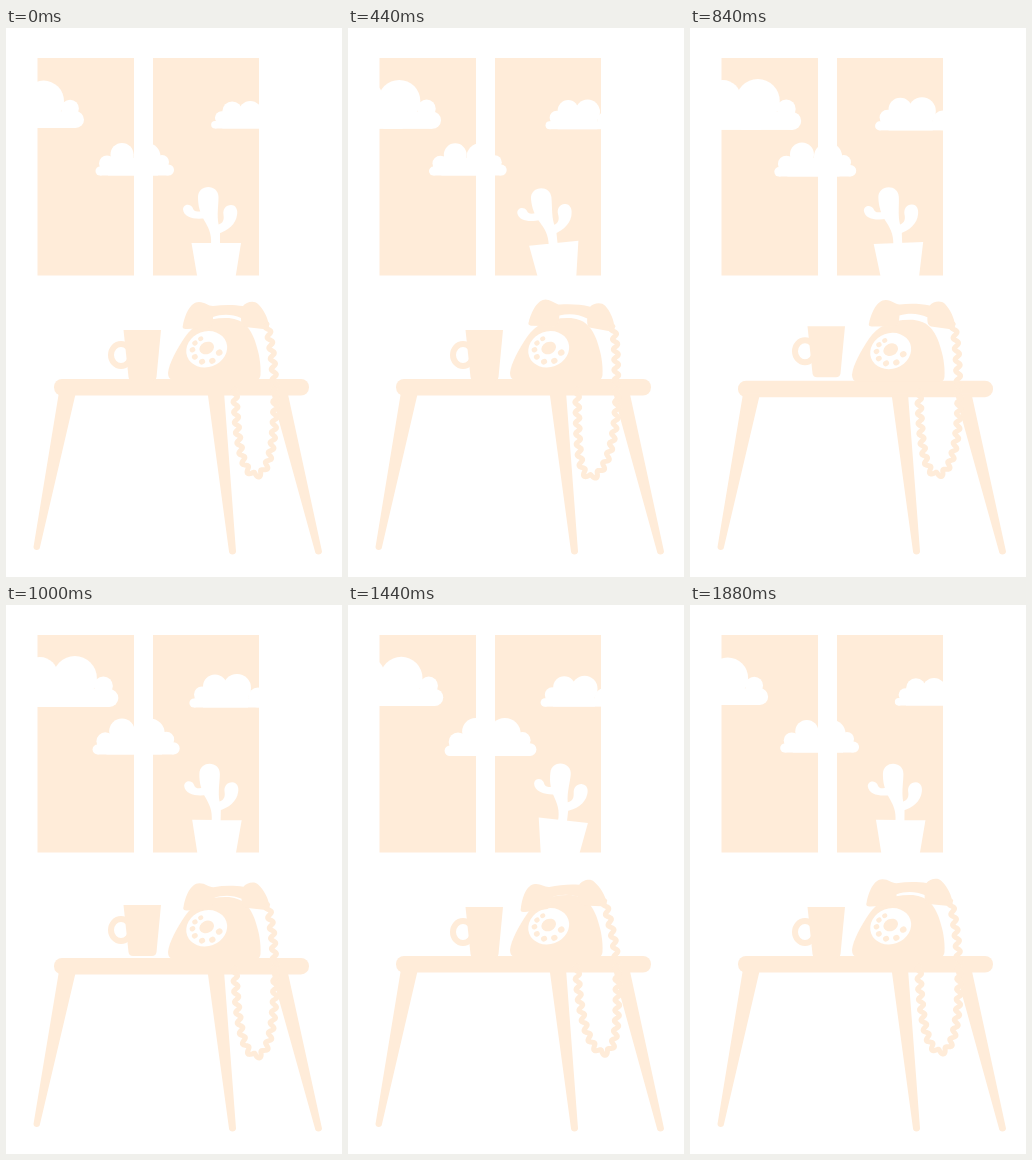
Recreate the animation shown at these times as an HTML page with a canvas. Size 336x549 px, loop 1920 ms.

```html
<!DOCTYPE html>
<html lang="en">
<head>
<meta charset="utf-8">
<title>Ringing telephone</title>
<style>
  html, body { margin: 0; width: 100%; height: 100%; overflow: hidden; background: #fff; }
  canvas { display: block; width: 336px; height: 549px; }
</style>
</head>
<body>
<canvas id="stage" width="336" height="549"></canvas>
<script>
const ctx = document.getElementById('stage').getContext('2d');
const LOOP = 1920, STEP = 40;
const TAN = '#ffecd9', WHITE = '#fff';
const TIMES = [0, 440, 720, 1000, 1200, 1440];

// Smooth looping curve through one value per entry of TIMES, without overshoot.
function track(...v) {
  const n = TIMES.length;
  const span = TIMES.map((t, i) => (i + 1 < n ? TIMES[i + 1] : LOOP) - t);
  const rise = v.map((a, i) => (v[(i + 1) % n] - a) / span[i]);
  const slope = rise.map((b, i) => {
    const a = rise[(i + n - 1) % n];
    return a * b > 0 ? 2 * a * b / (a + b) : 0;
  });
  return t => {
    let i = n - 1;
    while (TIMES[i] > t) i--;
    const j = (i + 1) % n, h = span[i], u = (t - TIMES[i]) / h, w = 1 - u;
    return w * w * (1 + 2 * u) * v[i] + u * u * (3 - 2 * u) * v[j]
      + h * u * w * (w * slope[i] - u * slope[j]);
  };
}

const midX = track(89, 80.5, 82.5, 86, 90, 96);
const midY = track(147.5, 147.5, 148, 149.5, 151, 151);
const midScale = track(1, 0.99, 1.01, 1.11, 1.18, 1.17);
const potTilt = track(0, -0.1, -0.07, 0.015, 0.09, 0.113);
const mugY = track(0, 0, -5, -2, -3, 0);
const handX = track(0, 4.5, 3.5, 0.5, -3, -5);
const handY = track(0, -0.5, -4.5, 4, 3, 3);
const handTilt = track(0, 0.07, 0.055, -0.01, -0.045, -0.075);
const tipX = track(250, 243, 246, 250.5, 254.5, 256);
const tipY = track(447, 449, 444, 451, 448, 448);

const wave = (t, delay = 0) => (1 - Math.cos(2 * Math.PI * (t - delay) / LOOP)) / 2;
const tableDip = t => t > 480 && t < 1440 ? 2 * Math.sin(Math.PI * (t - 480) / 960) ** 2 : 0;

// Circles are [x, y, r], slabs [x, y, w, h], measured from a bottom corner.
const LEFT_CLOUD = {
  puffs: [[-78.5, -32, 18], [-43.5, -29, 22], [-15, -21, 9.5], [-9, -9, 9]],
  slabs: [[-110, -30, 70, 30], [-60, -18, 51, 18]]
};
const RIGHT_CLOUD = {
  puffs: [[5, -4.5, 4.6], [13, -13, 8], [26, -21, 12], [48, -19.5, 14], [69, -10, 10]],
  slabs: [[5, -9, 75, 9], [14, -18, 45, 18]]
};
const MID_CLOUD = {
  puffs: [[5, -4.5, 4.5], [12, -12, 8], [27, -21, 11.5], [52, -19, 13.5], [67, -13.5, 7], [73.5, -5.5, 5.5]],
  slabs: [[5, -9, 68.5, 9], [13, -18, 50, 18]]
};

const BODY = new Path2D(`M167 352 Q162 351 162 345 C163 335 171 321 179 309
  C187 297 200 290 220 290 C236 290 244 299 249 313 C253 325 255 335 254.500 347
  Q254 352 250 352 Z`);
const HANDSET = new Path2D(`M177 297 C179 287 184 274 193 274 C199 274 202 278 207 278
  C217 276.500 228 276.500 237 278 C240 274 248 272 252 276 C258 282 262 290 263 298
  C263 302 260 302 257 301 L239 299 C236 298 235 296 235 290
  C226 286 216 286 207 289 C207 295 206 300 202 300 L181 301 C177 301 176 300 177 297 Z`);
const MUG = new Path2D('M117.500 302 H155 L150.500 349 Q150 353 146 353 H127 Q123 353 122.500 349 Z');
const CACTUS = new Path2D(`M185.500 215 H235 L227.500 262 H193.500 Z
  M192 169 C192 155.500 212.500 155.500 212.500 169 C212.500 180 210 190 214 202 V217 H205
  C206 205 202 199 198 192 C194 185 192 178 192 169 Z`);
const ARMS = new Path2D(`M177 181.500 C177 176 184 175 186.500 179.500 C188 184 191 184 196 183
  L200 190 C190 192 178 190 177 181.500 Z
  M217.500 187 C216.500 181 220 177 225 177 C230 177 232 182 231 187
  C230 196 222 203 211 206 V197 C216 196 218.500 193 217.500 187 Z`);

function at(x, y, draw, turn = 0, scale = 1) {
  ctx.save();
  ctx.translate(x, y);
  ctx.rotate(turn);
  ctx.scale(scale, scale);
  draw();
  ctx.restore();
}

function oval(x, y, rx, ry, turn, color) {
  ctx.fillStyle = color;
  ctx.beginPath();
  ctx.ellipse(x, y, rx, ry, turn, 0, 2 * Math.PI);
  ctx.fill();
}

function cloud(shape, x, y, scale) {
  at(x, y, () => {
    for (const [cx, cy, r] of shape.puffs) oval(cx, cy, r, r, 0, WHITE);
    for (const s of shape.slabs) ctx.fillRect(...s);
  }, 0, scale);
}

function leg(topY, left, right, footL, footR, footY) {
  ctx.beginPath();
  ctx.moveTo(left, topY);
  ctx.lineTo(right, topY);
  ctx.lineTo(footR, footY);
  ctx.bezierCurveTo(footR, footY + 4, footL, footY + 4, footL, footY);
  ctx.fill();
}

// Points along a cubic curve given by four [x, y] pairs.
function curve(a, b, c, d, count = 120) {
  const mix = (k, u, w) => w * w * w * a[k] + 3 * w * w * u * b[k] + 3 * w * u * u * c[k] + u * u * u * d[k];
  return Array.from({ length: count + 1 }, (_, i) => {
    const u = i / count;
    return [mix(0, u, 1 - u), mix(1, u, 1 - u)];
  });
}

// Strokes a wavy line with a fixed number of coils along the points.
function coil(points, coils) {
  const dist = [0];
  for (let i = 1; i < points.length; i++) {
    dist[i] = dist[i - 1] + Math.hypot(points[i][0] - points[i - 1][0], points[i][1] - points[i - 1][1]);
  }
  const total = dist[dist.length - 1];
  ctx.beginPath();
  points.forEach(([x, y], i) => {
    const p = points[Math.max(0, i - 1)], q = points[Math.min(points.length - 1, i + 1)];
    const dx = q[0] - p[0], dy = q[1] - p[1], len = Math.hypot(dx, dy) || 1;
    const off = 2.4 * Math.sin(2 * Math.PI * coils * dist[i] / total);
    ctx.lineTo(x - dy / len * off, y + dx / len * off);
  });
  ctx.lineWidth = 5;
  ctx.lineJoin = ctx.lineCap = 'round';
  ctx.stroke();
}

function drawWindow(t) {
  ctx.fillStyle = TAN;
  ctx.fillRect(31.5, 30, 96.5, 217.500);
  ctx.fillRect(147, 30, 106, 217.500);
  const a = wave(t), b = wave(t, 50);
  cloud(LEFT_CLOUD, 78 + 34.5 * a, 100 + 2 * a, 0.93 + 0.07 * a);
  cloud(RIGHT_CLOUD, 205 - 22 * b, 100.5 + 2 * b, 0.82 + 0.18 * b);
  cloud(MID_CLOUD, midX(t), midY(t), midScale(t));
  at(210.5, 260, () => {
    ctx.translate(-210.5, -260);
    ctx.fillStyle = WHITE;
    ctx.fill(CACTUS);
    ctx.fill(ARMS);
  }, potTilt(t));
}

function drawTable(dip) {
  ctx.fillStyle = TAN;
  ctx.beginPath();
  ctx.roundRect(48, 351 + dip, 255, 16.5, 8);
  ctx.fill();
  const top = 364 + dip;
  leg(top, 53, 70, 27.5, 34, 519);
  leg(top, 201.5, 218, 223, 230, 523.5);
  leg(top, 265, 281.5, 309, 316, 523.5);
}

function drawMug(y) {
  at(0, y, () => {
    ctx.lineWidth = 6;
    ctx.beginPath();
    ctx.ellipse(115, 327, 10, 11, 0, 0, 2 * Math.PI);
    ctx.stroke();
    ctx.fill(MUG);
  });
}

function drawDial() {
  oval(200.7, 321.3, 20.8, 17.8, -0.35, WHITE);
  oval(200.7, 320, 7.6, 6, -0.45, TAN);
  [12, 62, 107, 146, 181, 215, 247].forEach((deg, i) => {
    const a = deg * Math.PI / 180, r = 3.4 - i * 0.13;
    oval(200 + 13.5 * Math.cos(a), 322 + 12.2 * Math.sin(a), r, r * 0.88, -0.5, TAN);
  });
}

function drawPhone(t, dip) {
  const hx = 220 + handX(t), hy = 287 + handY(t), turn = handTilt(t);
  at(0, dip, () => {
    ctx.fillStyle = TAN;
    ctx.fill(BODY);
    drawDial();
  });
  at(hx, hy, () => {
    ctx.translate(-220, -287);
    ctx.fillStyle = TAN;
    ctx.fill(HANDSET);
  }, turn);

  const end = [hx + 41 - 9 * turn, hy + 9 + 41 * turn];
  coil(curve(end, [end[0] + 4, end[1] + 20], [268, 335], [268.5, 360 + dip], 80), 6);
  const x = tipX(t), y = tipY(t);
  const left = curve([229, 361 + dip], [230, 410], [x - 14, y], [x, y]);
  const right = curve([x, y], [x + 14, y], [270, 410], [269, 361 + dip]);
  coil(left.concat(right.slice(1)), 18);
}

function draw(t) {
  const dip = tableDip(t);
  ctx.fillStyle = WHITE;
  ctx.fillRect(0, 0, 336, 549);
  ctx.strokeStyle = TAN;
  drawWindow(t);
  drawTable(dip);
  drawMug(mugY(t));
  drawPhone(t, dip);
}

const start = performance.now();
function tick() {
  const t = (performance.now() - start) % LOOP;
  draw(Math.floor(t / STEP) * STEP);
  requestAnimationFrame(tick);
}
tick();
</script>
</body>
</html>
```
